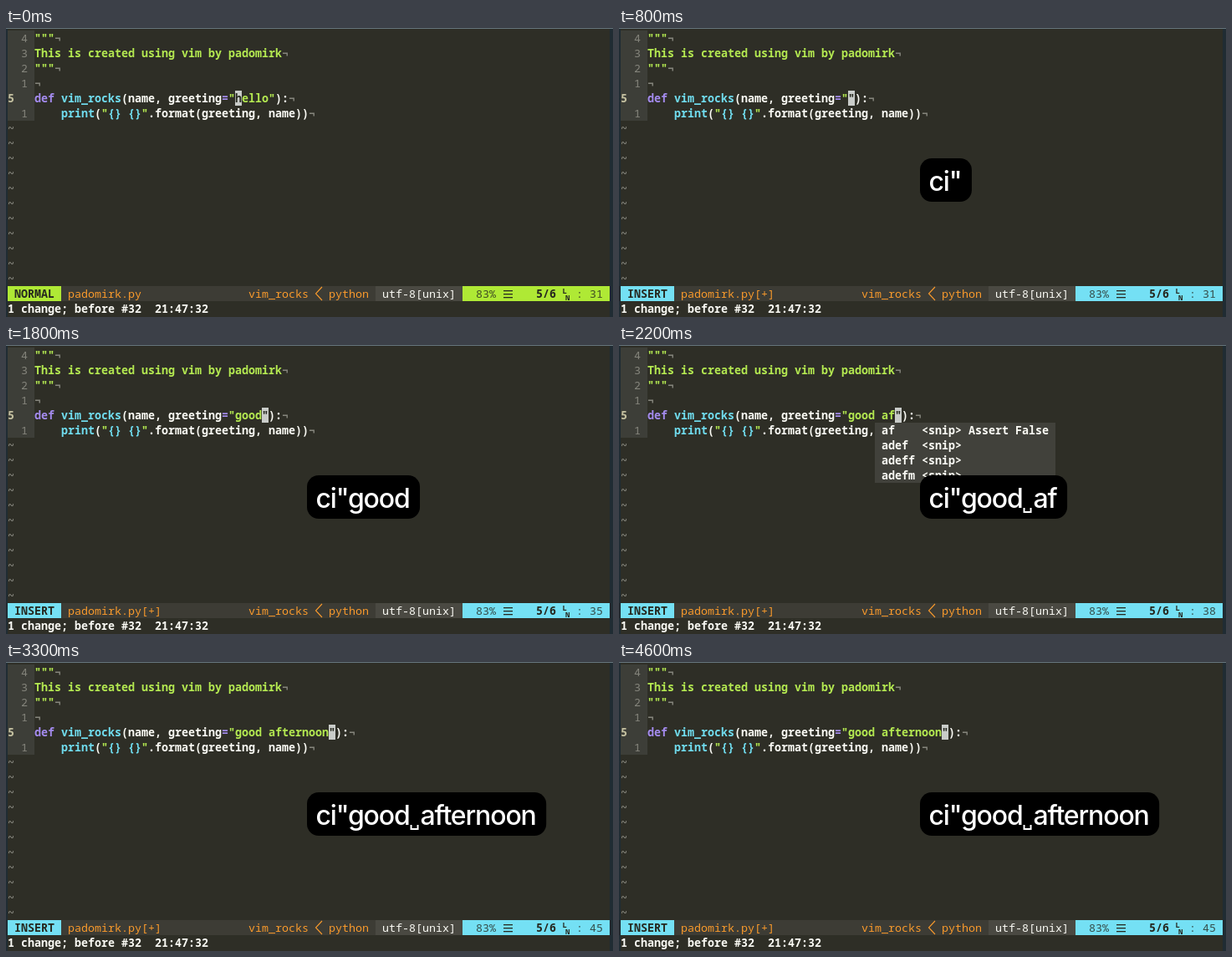
Recreate the animation shown at these times as an HTML page with a canvas. Size 726 px wide and 346 px high, loop 4700 ms.

```html
<!DOCTYPE html>
<html lang="en">
<head>
<meta charset="utf-8">
<title>Change inside quotes</title>
<style>
html, body { margin: 0; width: 726px; height: 346px; overflow: hidden; background: #2e2e26; }
canvas { display: block; }
</style>
</head>
<body>
<canvas id="stage" width="726" height="346"></canvas>
<script>
const ctx = document.getElementById("stage").getContext("2d");
const LOOP = 4700, CELL = 8, ROW = 18, LEFT = 2, TOP = 3;
const MONO = '"Noto Sans Mono", "DejaVu Sans Mono", monospace';
const SANS = 'Inter, "Liberation Sans", sans-serif';
const USER = "padomirk";
const C = {
  edge: "#202c33", rim: "#66757c", bg: "#2e2e26", gutter: "#3d3e38", bar: "#3d3c35",
  section: "#4a4942", text: "#fafaf4", dim: "#85857c", eol: "#85857c", string: "#b4e951",
  keyword: "#a58cf0", func: "#70dcee", orange: "#f99a2c", green: "#afe935", cyan: "#74e0f4",
  cursor: "#c9ccc9", dark: "#26281f", faint: "rgba(38, 40, 31, 0.8)", menu: "#41413b",
  lineNo: "#c4c0a0"
};

// Press time of each key; the first three are the command.
const keys = [..."ci\"good afternoon"];
const times = [500, 600, 800, 1300, 1400, 1600, 1700, 1900, 2100, 2200,
  2300, 2500, 2600, 2800, 2900, 3100, 3200];
const snippets = ["af    <snip> Assert False", "adef  <snip>", "adeff <snip>", "adefm <snip>"];

const colX = col => LEFT + col * CELL;
const rowY = row => TOP + row * ROW;

function box(x, y, w, h, color) {
  ctx.fillStyle = color;
  ctx.fillRect(x, y, w, h);
}

function put(col, row, text, color, weight = 600) {
  ctx.font = `${weight} 13.333px ${MONO}`;
  ctx.fillStyle = color;
  ctx.fillText(text, colX(col), rowY(row) + 14);
}

function codeLine(row, number, runs) {
  const current = number === 5;
  put(current ? 0 : 2, row, String(number), current ? C.lineNo : C.dim, current ? 700 : 500);
  let col = 4;
  for (const [text, color] of [...runs, ["¬", C.eol]]) {
    put(col, row, text, color);
    col += text.length;
  }
}

function code(greeting) {
  box(LEFT, TOP, 32, 6 * ROW, C.gutter);
  codeLine(0, 4, [['"""', C.string]]);
  codeLine(1, 3, [[`This is created using vim by ${USER}`, C.string]]);
  codeLine(2, 2, [['"""', C.string]]);
  codeLine(3, 1, []);
  codeLine(4, 5, [
    ["def ", C.keyword], ["vim_rocks", C.func], ["(name, greeting", C.text],
    ["=", C.keyword], [`"${greeting}"`, C.string], ["):", C.text]
  ]);
  codeLine(5, 1, [
    ["    print", C.func], ["(", C.text], ['"', C.string], ["{} {}", C.func],
    ['"', C.string], [".format(greeting, name))", C.text]
  ]);
  for (let row = 6; row < 17; row++) put(0, row, "~", C.dim);
}

function cursor(col, char) {
  box(colX(col), rowY(4), CELL, ROW, C.cursor);
  put(col, 4, char, C.dark);
}

function menu() {
  box(colX(38), rowY(5), 27 * CELL, 4 * ROW, C.menu);
  snippets.forEach((text, i) => put(39, 5 + i, text, C.text));
}

function status(insert, column) {
  const y = rowY(17), tint = insert ? C.cyan : C.green;
  box(LEFT, y, 720, ROW, C.bar);
  box(LEFT, y, 64, ROW, tint);
  box(442, y, 104, ROW, C.section);
  box(546, y, 176, ROW, tint);
  put(1, 17, insert ? "INSERT" : "NORMAL", C.dark, 700);
  put(9, 17, `${USER}.py${insert ? "[+]" : ""}`, C.orange, 500);
  put(36, 17, "vim_rocks", C.orange, 500);
  put(48, 17, "python", C.orange, 500);
  put(56, 17, "utf-8[unix]", C.text, 500);
  put(70, 17, "83%", C.faint, 400);
  put(79, 17, "5/6", C.dark, 700);
  put(85, 17, ":", C.faint, 500);
  put(87, 17, String(column), C.faint, 400);

  ctx.strokeStyle = C.orange;
  ctx.lineWidth = 1.1;
  ctx.beginPath();
  ctx.moveTo(378, y + 1);
  ctx.lineTo(370.5, y + 9);
  ctx.lineTo(378, y + 17);
  ctx.stroke();

  for (const dy of [5, 9, 13]) box(595, y + dy, 11, 1.3, C.dark);
  ctx.fillStyle = C.dark;
  ctx.font = `700 9px ${MONO}`;
  ctx.fillText("L", 665.5, y + 9);
  ctx.fillText("N", 669, y + 17);
}

function keycast(typed) {
  ctx.font = `500 32px ${SANS}`;
  ctx.letterSpacing = "-1.15px";
  const left = 370.5, [head, tail] = typed.split(" ");
  const headW = ctx.measureText(head).width;
  const gap = tail === undefined ? 0 : 13;
  const width = headW + gap + ctx.measureText(tail || "").width;
  ctx.fillStyle = "#000";
  ctx.beginPath();
  ctx.roundRect(360, 156, width + 23, 52, 14);
  ctx.fill();
  ctx.fillStyle = "#fff";
  ctx.fillText(head, left, 195);
  if (gap) {
    const x = left + headW + 2;
    ctx.fillText(tail, left + headW + gap, 195);
    ctx.strokeStyle = "#fff";
    ctx.lineWidth = 2;
    ctx.beginPath();
    ctx.moveTo(x, 195);
    ctx.lineTo(x, 200);
    ctx.lineTo(x + 8, 200);
    ctx.lineTo(x + 8, 195);
    ctx.stroke();
  }
  ctx.letterSpacing = "0px";
}

function draw(now) {
  const t = now % LOOP;
  const typed = keys.filter((_, i) => t >= times[i]).join("");
  const insert = typed.length >= 3;
  const greeting = insert ? typed.slice(3) : "hello";
  const offset = insert ? greeting.length : 0;

  box(0, 0, 726, 346, C.edge);
  box(0, 0, 726, 1, C.rim);
  box(LEFT, 1, 720, 345, C.bg);
  code(greeting);
  cursor(34 + offset, insert ? '"' : "h");
  if (greeting === "good af") menu();
  status(insert, 31 + offset);
  put(0, 18, "1 change; before #32  21:47:32", C.text);
  if (typed) keycast(typed);
}

function tick(now) {
  draw(now);
  requestAnimationFrame(tick);
}
requestAnimationFrame(tick);
</script>
</body>
</html>
```
